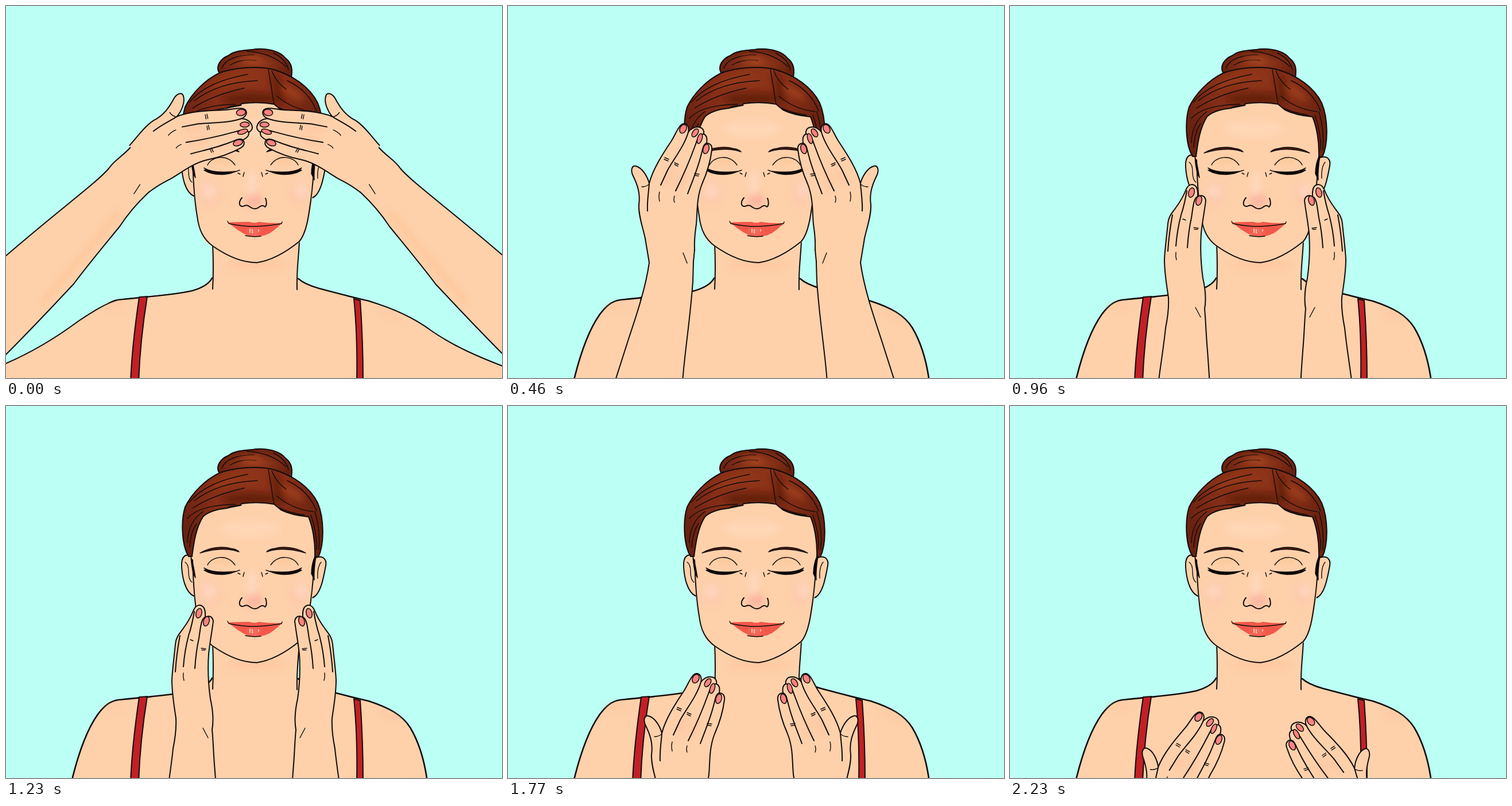
These frames come from a looping animation (864 px wide and 648 px high, 2460 ms). An HTML page without scripts:

```html
<!DOCTYPE html>
<html lang="en">
<head>
<meta charset="utf-8">
<title>Face massage</title>
<style>
  html, body { margin: 0; width: 100%; height: 100%; overflow: hidden; background: #bbfff5; }
  svg { display: block; width: 100vw; height: 100vh; }
  .ink, .line { stroke: #120c0a; stroke-width: 2; stroke-linecap: round; stroke-linejoin: round; }
  .line { fill: none; }
  .thin { stroke-width: 1.4; }
  .bold { stroke-width: 2.6; }
  .skin { fill: #fed1ab; }
  .nail { fill: #f98380; stroke-width: 1.5; }
  .strap { fill: #c22026; }

  /* Each pose is visible from --t for the length of its keyframes. */
  .pose { visibility: hidden; animation: short 2460ms step-end calc(var(--t) - 2460ms) infinite; }
  .long { animation-name: long; }
  .wide { animation-name: wide; }
  @keyframes short { 0% { visibility: visible } 9.3496%, 100% { visibility: hidden } }
  @keyframes long { 0% { visibility: visible } 10.9756%, 100% { visibility: hidden } }
  @keyframes wide { 0% { visibility: visible } 18.6992%, 100% { visibility: hidden } }
</style>
</head>
<body>
<svg viewBox="0 0 864 648">
  <defs>
    <filter id="soft" x="-50%" y="-50%" width="200%" height="200%"><feGaussianBlur stdDeviation="6"/></filter>
    <radialGradient id="hair" gradientUnits="userSpaceOnUse" cx="425" cy="125" r="135">
      <stop offset="0" stop-color="#8f3519"/><stop offset=".55" stop-color="#842e17"/><stop offset="1" stop-color="#6a2211"/>
    </radialGradient>
    <radialGradient id="bun">
      <stop offset="0" stop-color="#9a3d1d"/><stop offset="1" stop-color="#692110"/>
    </radialGradient>
    <path id="mane" d="M318 262C305 240 305 198 312 176C324 151 347 129 371 117C398 107 438 104 463 110C500 120 530 142 543 169C554 195 555 240 544 263L538 263C539 236 534 210 527 193Q497 190 479 181L467 171Q440 166 411 170L407 173Q390 174 385 178C365 180 350 186 343 193C330 214 327 240 324 262Z"/>
    <clipPath id="maneClip"><use href="#mane"/></clipPath>

    <!-- Back of an open hand; the origin is the thumb tip. -->
    <g id="open">
      <g transform="translate(-220 -279)">
        <path class="ink skin" d="M239 405C235 386 227 365 228 346C231 326 225 310 217 294C213 284 217 277 223 279C234 282 243 297 246 309C252 285 268 260 284 236C293 222 297 207 306 205C313 205 316 212 314 220C318 214 325 210 332 211C340 212 342 218 341 223C347 226 347 232 346 239C353 239 356 244 355 251C352 275 346 292 338 310C328 335 330 360 328 380C326 395 324 405 325 425"/>
        <g fill="#fcb795" opacity=".4" filter="url(#soft)">
          <ellipse cx="281" cy="296" rx="6" ry="20" transform="rotate(25 281 296)"/>
          <ellipse cx="303" cy="302" rx="6" ry="20" transform="rotate(20 303 302)"/>
        </g>
        <path class="line" d="M246 309C245 325 242 340 243 357M314 220C307 244 289 266 278 286L266 312M341 223C331 224 329 236 326 243C317 268 304 298 292 322M346 239C339 241 339 252 336 261C330 285 321 305 313 327"/>
        <path class="line thin" d="M233 315Q240 315 245 311M264 324Q262 332 264 340M290 331Q288 337 290 342M273 264L280 267M272 267L279 270M290 273L297 276M290 276L296 279M325 292L333 293M325 295L332 296M305 430L312 448"/>
        <g class="ink nail">
          <ellipse cx="305" cy="214" rx="5.5" ry="8" transform="rotate(28 305 214)"/>
          <ellipse cx="326" cy="221" rx="4.5" ry="8" transform="rotate(34 326 221)"/>
          <ellipse cx="334" cy="231" rx="4" ry="9" transform="rotate(18 334 231)"/>
          <ellipse cx="345" cy="249" rx="5" ry="8.5" transform="rotate(16 345 249)"/>
        </g>
      </g>
    </g>

    <!-- Elbow out, palm on the forehead. -->
    <g id="raised">
      <path class="ink skin" d="M232 256L217 246C203 262 189 268 179 283C160 306 90 357 0 435L-60 485V668L0 607C50 557 88 516 118 484C142 452 172 416 198 384C215 358 232 340 248 325L264 308"/>
      <path d="M198 357L143 424L63 517" fill="none" stroke="#ffc08f" stroke-width="10" opacity=".6" filter="url(#soft)"/>
      <use href="#open" transform="translate(307 154) rotate(54.5)"/>
    </g>

    <!-- Forearm upright, hand beside the temple. -->
    <g id="upright">
      <path class="ink skin" d="M252 398L239 405L246 447C240 490 225 535 210 580L186 655H304C308 600 317 550 322 480L323 445L325 425L312 412"/>
      <use href="#open" x="220" y="279"/>
    </g>

    <!-- Hand turned edge-on with its forearm. -->
    <g id="side">
      <path class="ink skin" d="M253 655C258 605 267 555 271 515C275 495 277 480 276 462C273 440 269 420 269 395C270 375 273 355 275 333C276 320 283 314 289 305C298 293 303 283 307 273C311 264 320 262 325 270C328 276 327 281 327 286C334 282 340 285 341 293C339 310 335 330 333 350C331 380 332 400 336 428C341 450 342 465 339 482C341 500 341 520 344 555C347 595 349 620 349 655"/>
      <path class="line" d="M283 318Q277 350 275 381M308 276Q304 300 298 318Q291 345 289 372M327 286C320 288 319 303 316 323Q311 345 309 375"/>
      <path class="line thin" d="M289 383Q288 390 290 396M301 325L306 327M320 340L328 341M321 343L327 343M323 479L332 496"/>
      <g class="ink nail">
        <ellipse cx="316" cy="279" rx="5" ry="8.5" transform="rotate(15 316 279)"/>
        <ellipse cx="329" cy="293" rx="5" ry="8.5" transform="rotate(16 329 293)"/>
      </g>
    </g>

    <g id="eye">
      <path d="M338 256C355 246 378 244 391 248Q401 249 406 254Q398 251 388 250C370 248 352 252 338 256Z" fill="#4a1a0e" class="ink thin"/>
      <path class="line thin" d="M351 277C358 262 385 257 399 277M415 290Q414 293 413 297M398 289L407 286M404 291L408 293"/>
      <path d="M345 282C358 290 382 290 400 288C388 295 368 295 353 290L345 286L349 286Z" fill="#0d0706" class="ink thin"/>
    </g>
  </defs>

  <rect width="864" height="648" fill="#bbfff5"/>

  <!-- Body -->
  <path class="ink skin bold" d="M114 655C126 605 140 565 160 537C172 521 182 514 195 512C240 507 290 504 325 496Q352 488 359 474L509 475Q520 485 545 492C575 500 605 508 632 514C668 526 690 538 704 560C722 590 730 625 734 655"/>
  <path class="pose wide ink skin" style="--t:0ms" d="M-8 626C50 602 95 572 126 549C150 533 175 517 195 512C240 507 290 504 325 496Q352 488 359 474L509 475Q520 485 545 492C575 500 605 508 632 514C672 526 708 541 740 565C780 593 825 612 872 630V660H-8Z"/>
  <path class="skin" d="M359 410H512L508 452V494H360Z"/>
  <g fill="#ffbd94" opacity=".4" filter="url(#soft)">
    <ellipse cx="436" cy="452" rx="55" ry="9"/>
    <ellipse cx="190" cy="524" rx="25" ry="4"/>
    <ellipse cx="670" cy="540" rx="25" ry="4" transform="rotate(22 670 540)"/>
  </g>
  <path class="line" d="M360 415Q362 455 360 493M511 408C510 440 506 455 507 494"/>
  <path class="ink strap" d="M232 507L246 506C238 555 233 600 231 655H217C219 600 225 555 232 507ZM606 510L617 513C620 555 622 600 622 655H611C612 600 610 550 606 510Z"/>

  <!-- Head -->
  <path class="ink skin" d="M326 262C313 256 305 261 306 280C307 298 312 324 327 331M536 266C551 258 559 266 557 278C553 300 548 328 534 334"/>
  <path class="line thin" d="M312 272Q318 276 318 288Q318 303 324 307M549 272Q542 280 543 300"/>
  <path class="skin" d="M324 230L330 190L430 155L530 190L538 250L534 330Q526 400 511 412Q470 446 435 447Q390 442 348 411Q332 390 327 320Z"/>
  <path class="line" d="M325 268C326 300 328 338 333 366C336 391 344 406 360 418C380 432 408 447 437 447C465 443 490 427 511 410C523 396 527 368 531 338Q536 300 536 275"/>
  <g filter="url(#soft)">
    <ellipse cx="354" cy="328" rx="20" ry="23" fill="#ffc0aa" opacity=".4"/>
    <ellipse cx="354" cy="323" rx="12" ry="13" fill="#ffdccb" opacity=".6"/>
    <ellipse cx="510" cy="326" rx="17" ry="22" fill="#ffc0aa" opacity=".4"/>
    <ellipse cx="514" cy="321" rx="10" ry="13" fill="#ffdccb" opacity=".6"/>
    <ellipse cx="432" cy="338" rx="15" ry="13" fill="#fb9f96" opacity=".55"/>
    <ellipse cx="428" cy="310" rx="6" ry="24" fill="#ffe0cf" opacity=".6"/>
    <ellipse cx="425" cy="214" rx="50" ry="14" fill="#ffdcc0" opacity=".6"/>
    <ellipse cx="378" cy="269" rx="20" ry="7" fill="#fbc28e" opacity=".5"/>
    <ellipse cx="484" cy="269" rx="20" ry="7" fill="#fbc28e" opacity=".5"/>
  </g>
  <use href="#eye"/>
  <use href="#eye" transform="translate(860) scale(-1 1)"/>
  <path class="line" d="M411 334C405 341 405 350 413 349Q420 345 425 350Q433 356 440 351Q447 345 451 350C455 347 454 339 452 335"/>

  <path d="M387 377Q405 376 424 376Q433 379 440 376Q462 379 481 378Q470 389 459 396Q445 403 428 402Q410 397 387 377Z" fill="#f2584a"/>
  <ellipse cx="431" cy="393" rx="9" ry="4" fill="#f9a091" opacity=".8" filter="url(#soft)"/>
  <path d="M425 388V395M429 389V396M440 389V393" stroke="#ffd5c8" stroke-width="1.5"/>
  <path class="line thin" d="M386 375L388 379Q410 384 434 384Q460 383 480 379L481 376M417 400Q431 403 444 401"/>

  <!-- Hair -->
  <path class="ink" fill="url(#bun)" d="M371 116C365 105 373 92 388 86C400 76 420 78 435 75C458 73 479 80 487 91C499 100 499 112 497 125Q440 105 371 116Z"/>
  <path class="line thin" d="M376 108C382 92 405 85 432 85M390 103Q410 91 436 95M420 79Q462 81 488 106M466 82Q488 93 492 111"/>
  <use href="#mane" fill="url(#hair)"/>
  <g clip-path="url(#maneClip)">
    <g filter="url(#soft)">
      <ellipse cx="425" cy="162" rx="48" ry="12" fill="#4f170a" opacity=".6"/>
      <ellipse cx="473" cy="145" rx="8" ry="30" fill="#4f170a" opacity=".6" transform="rotate(-12 473 145)"/>
      <ellipse cx="385" cy="132" rx="30" ry="4" fill="#a8431f" opacity=".7" transform="rotate(-22 385 132)"/>
      <ellipse cx="500" cy="152" rx="22" ry="5" fill="#b04a24" opacity=".75" transform="rotate(32 500 152)"/>
    </g>
  </g>
  <ellipse cx="427" cy="92" rx="20" ry="5" fill="#b04a24" opacity=".75" filter="url(#soft)"/>
  <use href="#mane" class="line"/>
  <path class="line thin" d="M457 111Q462 140 467 171M463 113Q470 132 488 145M319 168C340 143 372 128 421 119M328 165C355 144 390 132 438 130M325 178Q360 155 415 143M316 196C333 176 370 172 400 171M316 238Q317 202 343 184M320 246Q322 218 332 205M472 157Q499 180 535 184M490 130Q527 147 541 183M538 184Q548 215 545 250M531 190Q542 220 541 250M475 177Q496 187 520 190M385 178L410 173"/>
  <path d="M322 262C327 277 328 288 330 299Q324 291 322 262ZM538 262Q532 276 532 292L537 303Q536 285 540 262Z" class="ink thin"/>

  <!-- Hands -->
  <g class="pose" style="--t:0ms">
    <use href="#raised"/>
    <use href="#raised" transform="translate(866) scale(-1 1)"/>
  </g>
  <g class="pose" style="--t:230ms">
    <use href="#raised" x="-39" y="22"/>
    <use href="#raised" transform="translate(904 13) scale(-1 1)"/>
  </g>
  <g class="pose" style="--t:460ms">
    <use href="#upright"/>
    <use href="#upright" transform="translate(860) scale(-1 1)"/>
  </g>
  <g class="pose long" style="--t:690ms">
    <use href="#side"/>
    <use href="#side" transform="translate(854) scale(-1 1)"/>
  </g>
  <g class="pose long" style="--t:960ms">
    <use href="#side" y="46"/>
    <use href="#side" transform="translate(854 46) scale(-1 1)"/>
  </g>
  <g class="pose long" style="--t:1230ms">
    <use href="#side" x="20" y="82"/>
    <use href="#side" transform="translate(844 82) scale(-1 1)"/>
  </g>
  <g class="pose long" style="--t:1500ms">
    <use href="#side" x="20" y="140"/>
    <use href="#side" transform="translate(844 140) scale(-1 1)"/>
  </g>
  <g class="pose" style="--t:1770ms">
    <use href="#open" x="242" y="540"/>
    <use href="#open" transform="translate(605 540) scale(-1 1)"/>
  </g>
  <g class="pose" style="--t:2000ms">
    <use href="#open" transform="translate(235 572) rotate(7)"/>
    <use href="#open" transform="translate(621 573) scale(-1 1) rotate(11)"/>
  </g>
  <g class="pose" style="--t:2230ms">
    <use href="#open" transform="translate(236 596) rotate(7)"/>
    <use href="#open" transform="translate(620 597) scale(-1 1) rotate(11)"/>
  </g>
</svg>
</body>
</html>
```
